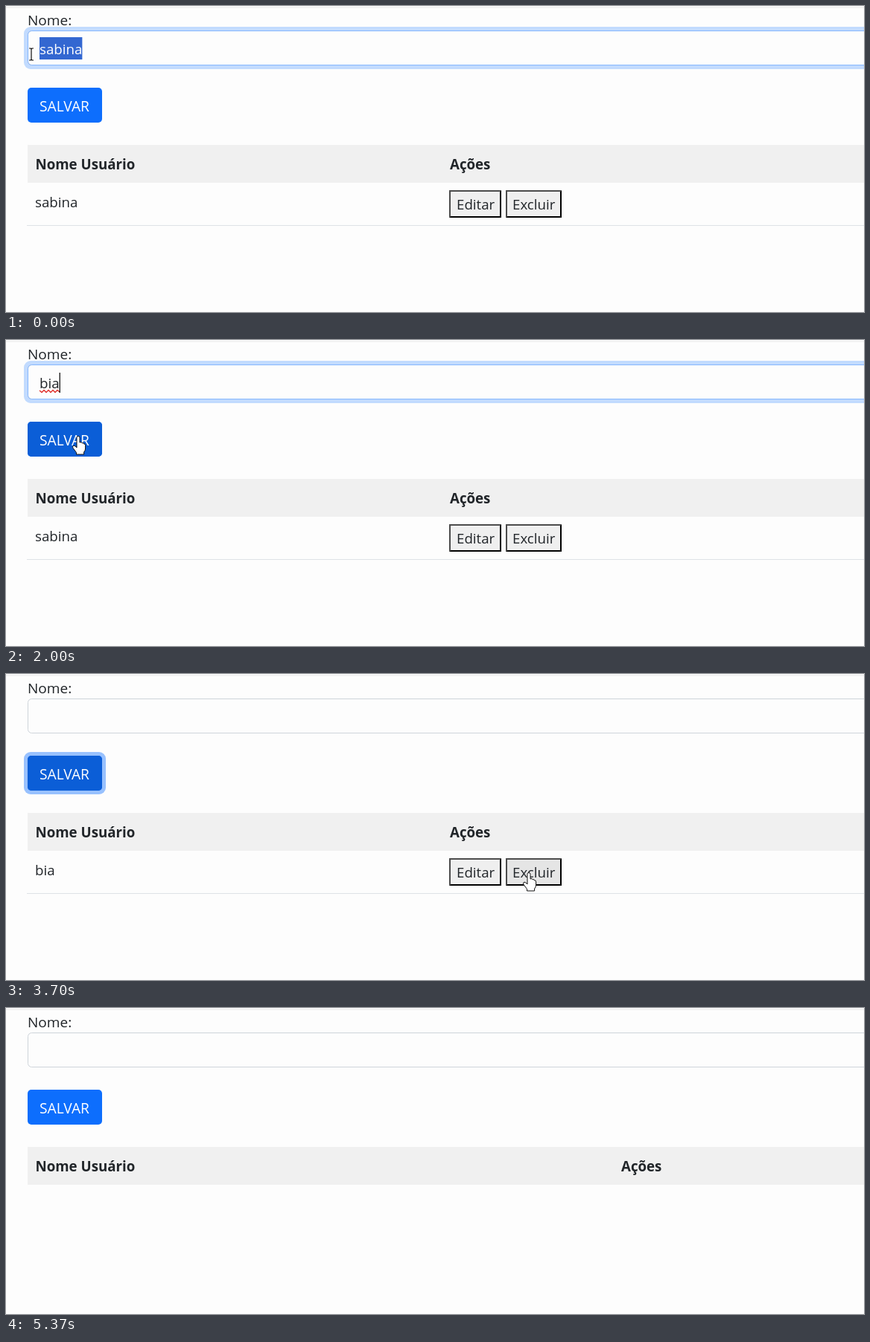
An HTML page for the animation above (5410 ms loop, 1152 by 412 pixels).

```html
<!DOCTYPE html>
<html lang="pt">
<head>
<meta charset="utf-8">
<style>
html, body { margin: 0; width: 1152px; height: 412px; overflow: hidden; background: #fdfdfd; }
svg { display: block; }
text { font: 18.7px "Open Sans", "Noto Sans", sans-serif; fill: #212529; }
.head { font-weight: 700; font-size: 18.7px; }
.light { fill: #fff; }
</style>
</head>
<body>
<svg width="1152" height="412" viewBox="0 0 1152 412">
  <rect y="1" width="1152" height="2" fill="#f2f2f2"/>
  <text x="29" y="26" style="font-size:19px">Nome:</text>

  <rect id="inputRing" x="24" y="28" width="1160" height="57" rx="9" fill="#c2dbfe"/>
  <rect x="29.5" y="33.5" width="1150" height="46" rx="5" fill="#fdfdfd" stroke="#ced4da"/>
  <rect id="inputEdge" x="29.5" y="33.5" width="1150" height="46" rx="5" fill="none" stroke="#86b7fe"/>
  <rect id="selection" x="45" y="42" height="30" fill="#3367d1"/>
  <text id="field" x="45" y="65"></text>
  <path id="squiggle" d="M45 68l3 2.5 3-3 3 3 3-3 3 3 3-3 3 3 3-3 3 2.5" fill="none" stroke="#e0302a" stroke-width="1.4"/>
  <rect id="caret" y="44" width="1.3" height="27" fill="#111"/>

  <rect id="saveRing" x="24" y="105" width="110" height="57" rx="9" fill="#98c1fe"/>
  <rect x="29" y="110" width="100" height="47" rx="5" fill="#0d6efd"/>
  <rect id="saveDark" x="29" y="110" width="100" height="47" rx="5" fill="#0b5ed7"/>
  <text class="light" x="45" y="142" style="font-size:19.2px">SALVAR</text>

  <rect x="29" y="187" width="1123" height="51" fill="#f0f0f0"/>
  <text class="head" x="39.5" y="220">Nome Usuário</text>
  <text class="head" id="actions" y="220">Ações</text>

  <g id="row">
    <path d="M28 295.5H1152" stroke="#dee2e6"/>
    <text id="user" x="39" y="271"></text>
    <g>
      <rect x="595" y="248" width="70" height="37" fill="#efefef"/>
      <path d="M595 285V248H665L663 250H597V283Z" fill="#4c4c4c"/>
      <path d="M595 285H665V248L663 250V283H597Z" fill="#000"/>
      <text x="605" y="274">Editar</text>
    </g>
    <g>
      <rect id="deleteFace" x="671" y="248" width="75" height="37"/>
      <path id="deleteTop" d="M671 285V248H746L744 250H673V283Z"/>
      <path id="deleteBottom" d="M671 285H746V248L744 250V283H673Z"/>
      <text x="680" y="274">Excluir</text>
    </g>
  </g>

  <g id="pointer" fill="#fff" stroke="#111" stroke-linejoin="round">
    <path id="beam" d="M-3-8H-1L0-7 1-8H3M0-7V7M-3 8H-1L0 7 1 8H3" fill="none" stroke-width="1.2"/>
    <path id="arrow" d="M.5.5V16.5L4.2 13 6.7 18.6 9 17.6 6.6 12H11.5Z"/>
    <path id="hand" d="M-2 1.5Q-2-.5 0-.5T2 1.5V8Q4.5 6.5 5 8.8 7.2 7.8 7.6 10 9.6 9.4 9.6 11.8V16Q9.6 19 7.6 21V24H-2.5V21.5L-7 15.5Q-8.5 12.5-6 12.2-4.5 12-2 15Z"/>
  </g>
</svg>
<script>
const LOOP = 5410, OLD = "sabina", NEW = "bia";
const KEYS = [600, 780, 950], LAST_KEY = 950;
const PRESS = 2150, SAVED = 2270, DELETE_PRESS = 3900, DELETED = 4130;

// time, x, y
const PATH = [
  [0, 34, 65], [1300, 34, 65], [1470, 67, 91], [1850, 97, 130], [2100, 97, 130],
  [2400, 99, 131], [2870, 99, 131], [3330, 668, 221], [3480, 702, 268],
  [4300, 702, 268], [4560, 730, 234], [5100, 1128, -22], [LOOP, 1128, -22]
];

const $ = id => document.getElementById(id);
const show = (id, on) => { $(id).style.display = on ? "" : "none"; };
const fade = (id, value) => $(id).setAttribute("opacity", value);
const ramp = (t, start) => Math.min(1, Math.max(0, (t - start) / 150));
const inside = ([px, py], x, y, w, h) => px >= x && px <= x + w && py >= y && py <= y + h;

function pointerAt(t) {
  const i = PATH.findIndex(p => p[0] > t);
  const [t0, x0, y0] = PATH[i - 1], [t1, x1, y1] = PATH[i];
  const k = (t - t0) / (t1 - t0);
  return [x0 + (x1 - x0) * k, y0 + (y1 - y0) * k];
}

function drawField(t) {
  const typed = KEYS.filter(k => k <= t);
  const selected = !typed.length;
  const field = $("field");
  field.textContent = t >= SAVED ? "" : selected ? OLD : NEW.slice(0, typed.length);
  field.classList.toggle("light", selected);
  const width = field.getComputedTextLength();
  $("selection").setAttribute("width", width);
  $("caret").setAttribute("x", 45 + width);
  show("selection", selected);
  show("squiggle", t >= 1750 && t < SAVED);
  const blinkOn = t < LAST_KEY || (t - LAST_KEY) % 1000 < 500;
  show("caret", !selected && t < PRESS && blinkOn);
  for (const id of ["inputRing", "inputEdge"]) fade(id, 1 - ramp(t, PRESS));
}

function drawRow(t, hover) {
  const pressed = t >= DELETE_PRESS;
  show("row", t < DELETED);
  $("user").textContent = t < SAVED ? OLD : NEW;
  $("actions").setAttribute("x", t < DELETED ? 596 : 826);
  $("deleteFace").setAttribute("fill", hover && !pressed ? "#e5e5e5" : "#efefef");
  $("deleteTop").setAttribute("fill", pressed ? "#000" : "#4c4c4c");
  $("deleteBottom").setAttribute("fill", pressed ? "#4c4c4c" : "#000");
}

function draw(t) {
  const at = pointerAt(t);
  const overDelete = t < DELETED && inside(at, 671, 248, 75, 37);
  const overEdit = t < DELETED && inside(at, 595, 248, 70, 37);
  const hand = overDelete || overEdit || inside(at, 29, 110, 100, 47);
  const beam = inside(at, 29, 33, 1123, 47);

  drawField(t);
  drawRow(t, overDelete);
  fade("saveDark", ramp(t, 1655) - ramp(t, DELETE_PRESS));
  fade("saveRing", ramp(t, PRESS) - ramp(t, DELETE_PRESS));

  $("pointer").setAttribute("transform", `translate(${at.map(Math.round)})`);
  show("hand", hand);
  show("beam", beam);
  show("arrow", !hand && !beam);
}

const start = performance.now();
function tick() {
  draw((performance.now() - start) % LOOP);
  requestAnimationFrame(tick);
}
tick();
</script>
</body>
</html>
```
